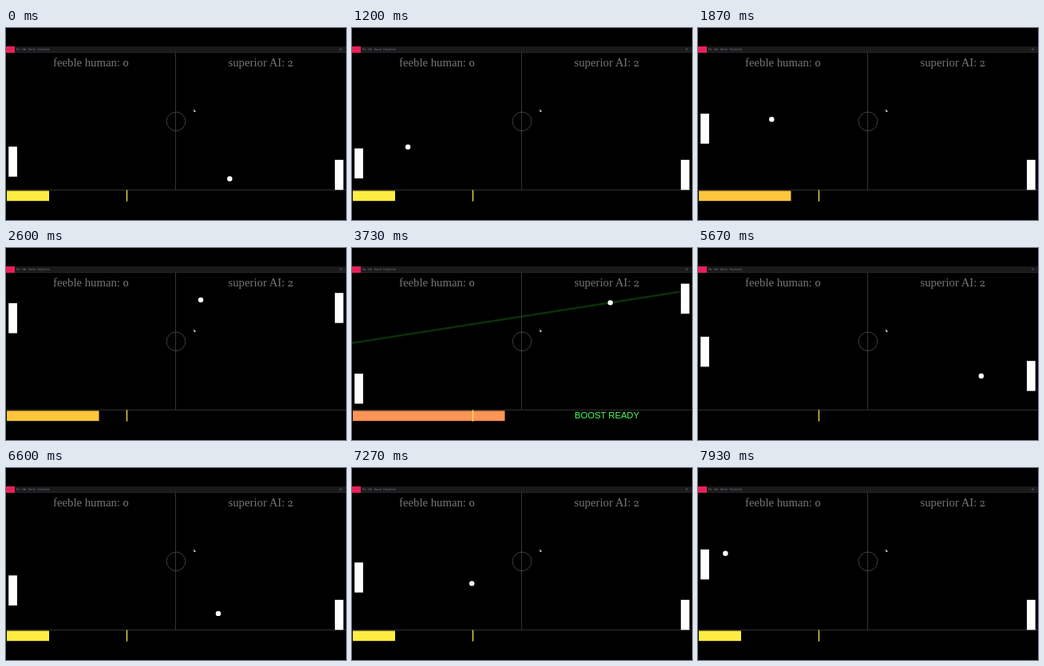
An HTML page with a canvas that plays this animation: 426x240 px, repeating every 8000 ms.

```html
<!DOCTYPE html>
<html lang="en">
<head>
<meta charset="utf-8">
<title>Pong with boost</title>
<style>
html, body { margin: 0; width: 100%; height: 100%; overflow: hidden; background: #000; }
canvas, svg { position: absolute; left: 0; top: 0; width: 426px; height: 240px; }
text { font: 14.75px "Liberation Serif", serif; fill: #757575; }
.score { font: 13.2px "Noto Serif", serif; font-variant-numeric: oldstyle-nums; text-anchor: middle; }
</style>
</head>
<body>
<canvas id="stage" width="426" height="240"></canvas>
<svg viewBox="0 0 426 240">
  <text x="59" y="48.4">feeble human:</text><text class="score" x="150" y="48.4">0</text>
  <text x="278.5" y="48.4">superior AI:</text><text class="score" x="356.3" y="48.4">2</text>
</svg>
<script>
const ctx = document.getElementById('stage').getContext('2d');
const LOOP = 8000, FPS = 15;
const TOP = 31, FLOOR = 202.5, MID = 212.5;
const PADDLE_W = 10.7, PADDLE_H = 37.5, BALL_R = 3.2;

// Times of the paddle hits, in ms
const HIT_HUMAN = 1503, HIT_AI = 3396, HIT_BOOST = 4953, HIT_RETURN = 5780;

// Corners of the ball's path: time, x, y
const ballPath = [
  [0, 280.3, 188.5], [HIT_HUMAN, 17, 138.6], [3054, 338, 34.3], [HIT_AI, 408.5, 55.2],
  [HIT_BOOST, 17, 116], [HIT_RETURN, 408.5, 167], [6320, 314.6, 197.7], [LOOP, 22.8, 103]
];
// Paddle tops: time, y
const humanPath = [
  [0, 148.3], [1200, 150.5], [HIT_HUMAN, 126], [2600, 69], [3100, 105], [3730, 157.3],
  [4800, 79.5], [HIT_BOOST, 93], [6600, 134.3], [7930, 102], [LOOP, 98]
];
const aiPath = [
  [0, 164.8], [2180, 164.8], [2300, 108], [2420, 78], [2600, 56.2], [3054, 33], [HIT_AI, 35],
  [3730, 44.5], [4050, 55], [5250, 55], [5400, 105], [5600, 136], [HIT_RETURN, 150],
  [6050, 164.8], [LOOP, 164.8]
];

function along(path, t) {
  const i = Math.max(1, path.findIndex(p => p[0] >= t));
  const a = path[i - 1], b = path[i];
  const k = (t - a[0]) / (b[0] - a[0]);
  return a.slice(1).map((v, j) => v + (b[j + 1] - v) * k);
}

function rect(x, y, w, h, color) {
  ctx.fillStyle = color;
  ctx.fillRect(x, y, w, h);
}

function line(x1, y1, x2, y2, color, width = 1) {
  ctx.strokeStyle = color;
  ctx.lineWidth = width;
  ctx.beginPath();
  ctx.moveTo(x1, y1);
  ctx.lineTo(x2, y2);
  ctx.stroke();
}

function text(str, x, y, font, color, align = 'left') {
  ctx.font = font;
  ctx.fillStyle = color;
  ctx.textAlign = align;
  ctx.fillText(str, x, y);
}

function meterAt(t) {
  if (t < HIT_HUMAN || t >= HIT_RETURN) return [53, '#ffec42'];
  if (t < HIT_AI) return [115.5, '#ffc63c'];
  if (t < HIT_BOOST) return [190.5, '#ff9455'];
  return [0, '#000'];
}

function drawToolbar() {
  rect(0, 23, 426, 7, '#1a1a1c');
  line(0, 30.5, 426, 30.5, '#26262c');
  rect(0, 23, 11, 8, '#e8205a');
  text('File   Edit   Sketch   Help & Info', 13, 28, '3px "Open Sans", sans-serif', '#85858c');
  text('Hi', 418, 28, '3px "Open Sans", sans-serif', '#85858c');
}

function drawCourt() {
  line(MID, TOP, MID, FLOOR, '#343434');
  line(0, FLOOR, 426, FLOOR, '#303030');
  ctx.strokeStyle = '#555';
  ctx.lineWidth = 0.75;
  ctx.beginPath();
  ctx.arc(213, 116.8, 11.8, 0, Math.PI * 2);
  ctx.stroke();
}

function drawCursor() {
  ctx.fillStyle = '#ddd';
  ctx.beginPath();
  ctx.moveTo(235, 101.5);
  ctx.lineTo(238, 104.2);
  ctx.lineTo(235.6, 105.2);
  ctx.fill();
}

function draw(t) {
  rect(0, 0, 426, 240, '#000');
  const ready = t >= HIT_AI && t < HIT_BOOST;
  if (ready) line(411, 54.8, 0, 118.8, '#0b300b', 2.6);
  drawToolbar();
  drawCourt();

  const [width, color] = meterAt(t);
  rect(1, 203.5, width, 12.7, color);
  rect(150.9, 202.5, 1.2, 14.2, '#fff04e');
  if (ready) text('BOOST READY', 319.5, 213, '11.2px "Liberation Sans", sans-serif', '#46ff55', 'center');

  rect(3.2, along(humanPath, t)[0], PADDLE_W, PADDLE_H, '#fff');
  rect(412, along(aiPath, t)[0], PADDLE_W, PADDLE_H, '#fff');

  const [x, y] = along(ballPath, t);
  ctx.fillStyle = '#fff';
  ctx.beginPath();
  ctx.arc(x, y, BALL_R, 0, Math.PI * 2);
  ctx.fill();
  drawCursor();
}

const start = performance.now();
function tick() {
  const t = (performance.now() - start) % LOOP;
  const step = Math.floor(t * FPS / 1000 + 0.1);
  draw(Math.min(step * 1000 / FPS, LOOP));
  requestAnimationFrame(tick);
}
tick();
</script>
</body>
</html>
```
